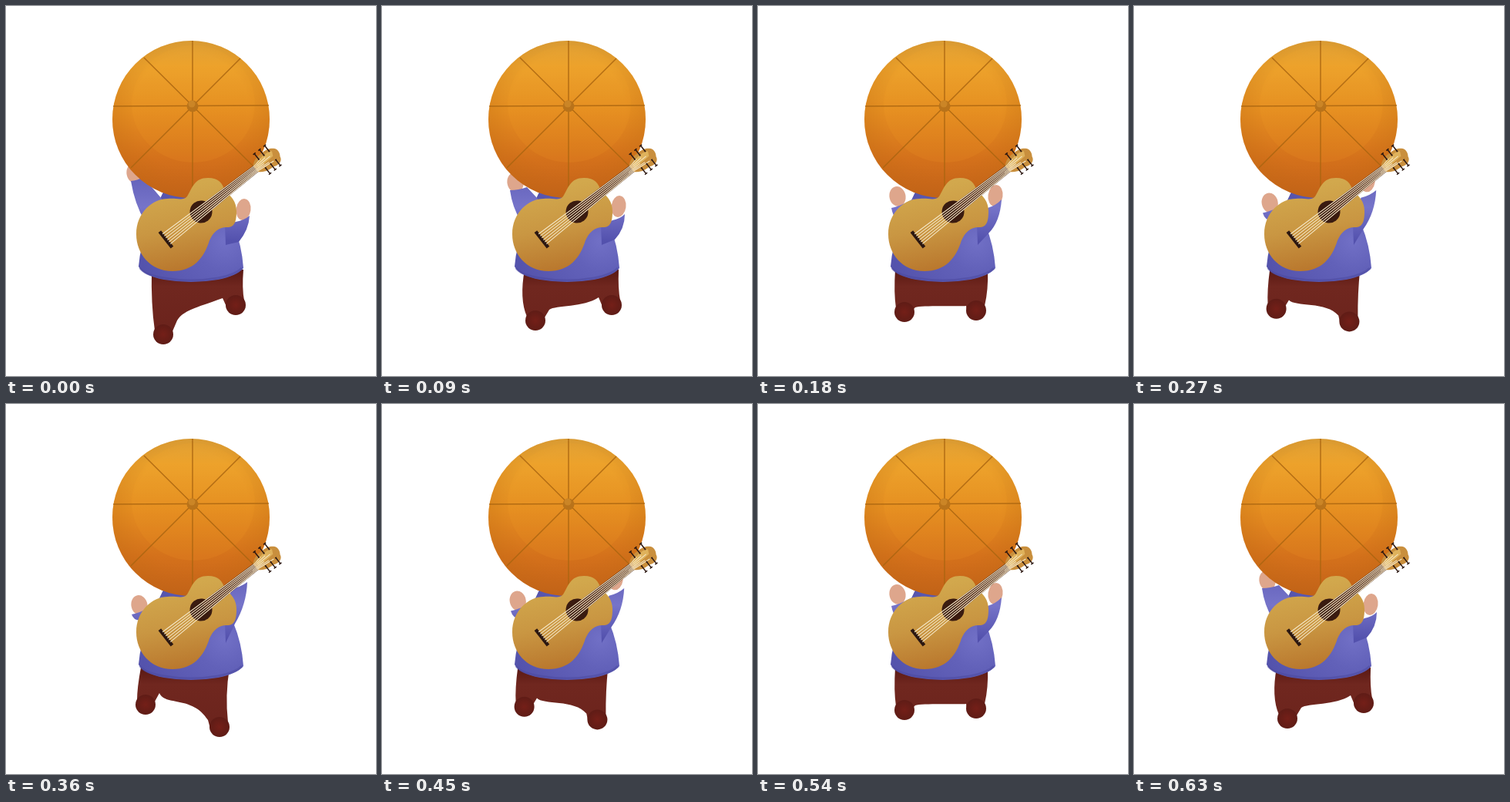
An HTML page that plays this animation: 480 px wide and 480 px high, repeating every 0.72 s.

```html
<!DOCTYPE html>
<html lang="en">
<head>
<meta charset="utf-8">
<title>Walking with umbrella and guitar</title>
<style>
html, body { margin: 0; width: 100%; height: 100%; overflow: hidden; background: #fff; }
svg { display: block; width: 100vw; height: 100vh; }
</style>
</head>
<body>
<svg viewBox="0 0 480 480">
  <defs>
    <linearGradient id="canopy" x2="0" y2="1">
      <stop offset="0" stop-color="#dda137"/>
      <stop offset=".16" stop-color="#eba22c"/>
      <stop offset=".45" stop-color="#e38c20"/>
      <stop offset=".75" stop-color="#d4711b"/>
      <stop offset="1" stop-color="#c5621a"/>
    </linearGradient>
    <radialGradient id="rim" cx=".5" cy=".45" r=".56">
      <stop offset=".66" stop-color="#b8650f" stop-opacity="0"/>
      <stop offset="1" stop-color="#b8650f" stop-opacity=".3"/>
    </radialGradient>
    <radialGradient id="cloth" gradientUnits="userSpaceOnUse" cx="284" cy="305" r="110">
      <stop offset="0" stop-color="#7170c6"/>
      <stop offset=".35" stop-color="#6261b9"/>
      <stop offset="1" stop-color="#5453ac"/>
    </radialGradient>
    <linearGradient id="sleeve" gradientUnits="userSpaceOnUse" x1="0" y1="225" x2="0" y2="305">
      <stop offset="0" stop-color="#6664bc"/>
      <stop offset=".45" stop-color="#7674c9"/>
      <stop offset="1" stop-color="#5351ad"/>
    </linearGradient>
    <linearGradient id="pants" gradientUnits="userSpaceOnUse" x1="0" y1="345" x2="0" y2="430">
      <stop offset="0" stop-color="#5c1a14"/>
      <stop offset=".22" stop-color="#70271f"/>
      <stop offset="1" stop-color="#6b231c"/>
    </linearGradient>
    <radialGradient id="shoe">
      <stop offset="0" stop-color="#741f18"/>
      <stop offset="1" stop-color="#5f1c16"/>
    </radialGradient>
    <linearGradient id="wood" gradientUnits="userSpaceOnUse" x1="225" y1="235" x2="245" y2="340">
      <stop offset="0" stop-color="#d2a84d"/>
      <stop offset=".5" stop-color="#c99642"/>
      <stop offset="1" stop-color="#b9772d"/>
    </linearGradient>
  </defs>

  <path id="legs" fill="url(#pants)"/>
  <g fill="url(#shoe)"><circle id="footL" r="13"/><circle id="footR" r="13"/></g>
  <path fill="url(#cloth)" d="M207 235L198 254L188 278Q174 310 172 338Q178 350 205 355Q240 361 275 355Q300 350 308 340Q306 310 295 284L288 235Z"/>
  <path fill="none" stroke="#4a48a0" stroke-width="3" opacity=".5" d="M174 340Q180 349 205 353Q240 359 275 353Q299 348 306 340"/>
  <g fill="#dea68c"><ellipse id="handL" rx="10.5" ry="13"/><ellipse id="handR" rx="9.5" ry="14"/></g>
  <g fill="url(#sleeve)"><path id="armL"/><path id="armR"/></g>

  <circle cx="240" cy="147" r="102" fill="url(#canopy)"/>
  <circle cx="240" cy="147" r="102" fill="url(#rim)"/>
  <ellipse cx="243" cy="127" rx="80" ry="76" fill="#f2a52b" opacity=".13"/>
  <path stroke="#aa6510" stroke-width="1.5" opacity=".85" d="M242 45V248M139 130L341 129M179 67L322 209M304 68L162 210"/>
  <circle cx="242" cy="130" r="7.5" fill="#b9731a"/>
  <circle cx="241" cy="127" r="4.5" fill="#cb8526"/>

  <path fill="url(#wood)" d="M235 247C242 236 244 223 262 223C276 223 281 230 284 240C292 246 299 254 299 266C299 276 298 286 289 287C276 286 269 293 264 304C257 327 243 344 216 344C187 344 169 321 169 296C169 268 190 250 210 250C222 249 230 253 235 247Z"/>
  <g id="guitar" transform="translate(253 267) rotate(-38.2)" fill="none">
    <circle r="14.5" fill="#3a1b10"/>
    <path fill="#4b2415" d="M6 -7L93 -5V5L6 7Z"/>
    <path fill="#c98f3d" d="M90 -5C95 -10 101 -12 109 -11C116 -12 122 -9 124 -7C129 -4 128 3 125 7C124 14 116 15 110 12C101 12 96 10 90 5Z"/>
    <path fill="#dfb25c" d="M94 -4C103 -8 115 -9 121 -5L118 1L94 2Z"/>
    <path stroke="#2b1711" stroke-width="4.5" d="M-58 -13V13"/>
    <path id="strings" stroke="#f6e9c9" stroke-width="1"/>
    <path id="pegs" stroke="#2b1711" stroke-width="1.5"/>
  </g>
</svg>
<script>
const $ = id => document.getElementById(id);
const set = (id, attrs) => { for (const k in attrs) $(id).setAttribute(k, attrs[k]); };

let strings = '', pegs = '';
for (let i = 0; i < 6; i++) {
  const k = i - 2.5;
  strings += `M-57 ${k * 3.3}L92 ${k * 1.6}L${103 + i % 3 * 6} ${k * 2.6}`;
}
for (const side of [-1, 1])
  for (const x of [101, 109.5, 118])
    pegs += `M${x} ${side * 7}V${side * 16}M${x - 2} ${side * 16.5}h4M${x - 1} ${side * 7}h2`;
set('strings', { d: strings });
set('pegs', { d: pegs });

// legs: hips, outer bend, foot, inner edge (4 points), foot, outer bend
// left/right arm: hand, inner wrist, outer wrist, bend (right adds its end)
const stride = {
  legs: [189, 308, 188, 387, 204, 426, 222, 408, 230, 395, 245, 392, 281, 379, 298, 388, 306, 366],
  left: [167, 217, 178, 222, 162, 227, 167, 257],
  right: [308, 264, 298, 280, 316, 272, 315, 290, 302, 306]
};
const lift = {
  legs: [185, 307, 178, 380, 199, 408, 217, 394, 225, 388, 262, 391, 281, 378, 298, 388, 306, 366],
  left: [173, 229, 188, 235, 166, 239, 169, 261],
  right: [307, 260, 299, 278, 315, 270, 315, 289, 302, 303]
};
const stand = {
  legs: [178, 298, 176, 372, 190, 397, 204, 391, 212, 388, 262, 390, 270, 389, 283, 395, 299, 368],
  left: [181, 247, 196, 253, 173, 262, 175, 272],
  right: [308, 246, 298, 262, 316, 251, 314, 280, 299, 295]
};
const swap = {
  legs: [175, 290, 170, 368, 181, 390, 199, 375, 206, 392, 242, 378, 262, 410, 277, 419, 284, 378],
  left: [173, 261, 186, 264, 163, 273, 167, 284],
  right: [300, 215, 292, 240, 313, 231, 312, 260, 297, 285]
};
const mix = (a, b, t) => Object.fromEntries(Object.keys(a).map(
  k => [k, a[k].map((v, i) => v + (b[k][i] - v) * t)]));
const pass = mix(stand, swap, 0.6);
const cycle = [stride, lift, stand, pass, swap, pass, stand, lift];

function draw({ legs, left, right }) {
  const [hipL, hipR, olx, oly, flx, fly, ax, ay, bx, by, cx, cy, dx, dy, frx, fry, orx, ory] = legs;
  set('legs', { d: `M${hipL} 342Q${olx} ${oly} ${flx - 11} ${fly - 5}L${flx} ${fly}L${flx + 12} ${fly - 4}L${ax} ${ay}` +
    `C${bx} ${by} ${cx} ${cy} ${dx} ${dy}L${frx - 12} ${fry + 2}L${frx} ${fry}L${frx + 11} ${fry - 6}Q${orx} ${ory} ${hipR} 342Z` });
  set('footL', { cx: flx, cy: fly });
  set('footR', { cx: frx, cy: fry });

  const [lx, ly, lix, liy, lox, loy, lbx, lby] = left;
  set('handL', { cx: lx, cy: ly, transform: `rotate(-12 ${lx} ${ly})` });
  set('armL', { d: `M202 250L${lix} ${liy}Q${(lix + lox) / 2} ${(liy + loy) / 2 + 2} ${lox} ${loy}Q${lbx} ${lby} 180 279L205 290Z` });

  const [rx, ry, rix, riy, rox, roy, rbx, rby, rex, rey] = right;
  set('handR', { cx: rx, cy: ry, transform: `rotate(8 ${rx} ${ry})` });
  set('armR', { d: `M284 285L${rix} ${riy}Q${(rix + rox) / 2 + 2} ${(riy + roy) / 2 + 2} ${rox} ${roy}Q${rbx} ${rby} ${rex} ${rey}L285 310Z` });
}

function tick() {
  draw(cycle[Math.floor(performance.now() / 90) % cycle.length]);
  requestAnimationFrame(tick);
}
tick();
</script>
</body>
</html>
```
